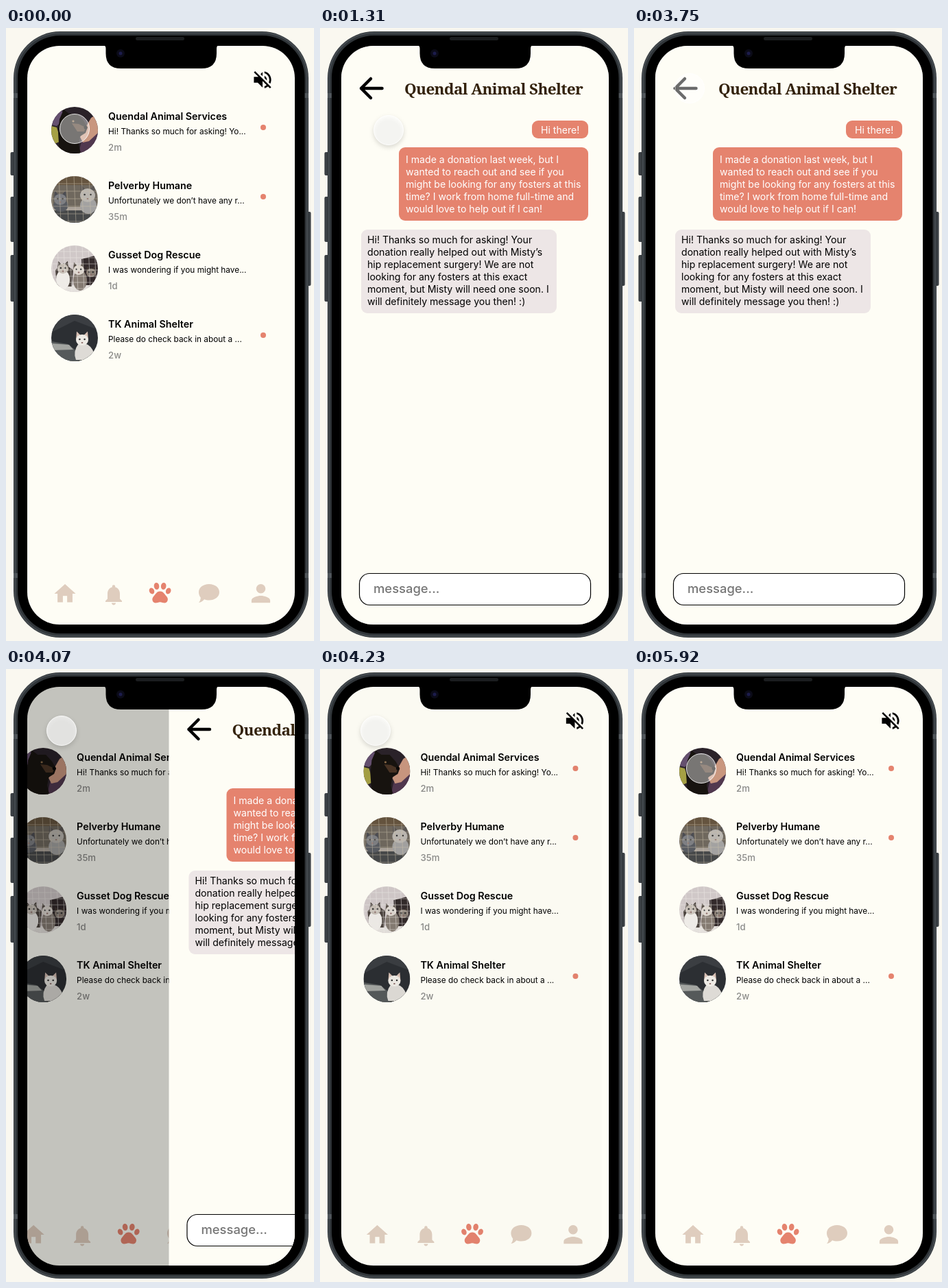
Write an HTML page that moves like this. It is 449 by 894 pixels and loops after 6080 ms.

```html
<!DOCTYPE html>
<html lang="en">
<head>
<meta charset="utf-8">
<title>Messages prototype</title>
<style>
  html, body { margin: 0; width: 100%; height: 100%; overflow: hidden; background: #faf8f0; }
  svg { display: block; }
  text { font-family: Inter, "Open Sans", sans-serif; }
  .name { font-size: 14.3px; font-weight: 600; }
  .preview { font-size: 11.85px; }
  .age { font-size: 13.2px; font-weight: 500; fill: #8b8b89; }
  .msg { font-size: 14.1px; }
  .hint { font-size: 18.4px; font-weight: 500; fill: #757575; }
  .head { font: bold 22.5px "Noto Serif", serif; letter-spacing: -.65px; fill: #33220c; }
  #cursor { fill: #fff; fill-opacity: .42; stroke: #fff; stroke-opacity: .85; }
  #cursor.released { fill-opacity: .66; filter: drop-shadow(0 3px 3px rgba(0, 0, 0, .2)); }
</style>
</head>
<body>
<svg width="449" height="894" viewBox="0 0 449 894">
  <defs>
    <clipPath id="screen"><rect x="31" y="26" width="390" height="844" rx="47"/></clipPath>
    <clipPath id="round"><circle r="34"/></clipPath>
  </defs>

  <!-- Phone body -->
  <g fill="#3a3f44">
    <rect x="6.500" y="181" width="7" height="34" rx="2"/>
    <rect x="6.500" y="246" width="7" height="66" rx="2"/>
    <rect x="6.500" y="331" width="7" height="68" rx="2"/>
    <rect x="438" y="268" width="6.500" height="108" rx="2"/>
  </g>
  <rect x="11" y="5" width="430" height="884" rx="68" fill="#303539"/>
  <rect x="13" y="7" width="426" height="880" rx="66" fill="none" stroke="#454b50" stroke-width="2"/>
  <path d="M11 95h6v7h-6zM435 95h6v7h-6zM11 795h6v7h-6zM435 795h6v7h-6z" fill="#50565b"/>
  <rect x="17" y="11" width="418.500" height="872" rx="62"/>

  <g clip-path="url(#screen)">
    <g id="list">
      <rect x="31" y="26" width="500" height="844" fill="#fefdf5"/>
      <g id="rows"></g>
      <path transform="translate(357.2 58.7) scale(1.4)" d="M16.5 12c0-1.77-1.02-3.29-2.5-4.03v2.21l2.45 2.45c.03-.2.05-.41.05-.63zm2.5 0c0 .94-.2 1.82-.54 2.64l1.51 1.51C20.63 14.91 21 13.5 21 12c0-4.28-2.99-7.86-7-8.77v2.06c2.89.86 5 3.54 5 6.71zM4.27 3L3 4.27 7.73 9H3v6h4l5 5v-6.73l4.25 4.25c-.67.52-1.42.93-2.25 1.18v2.06c1.38-.31 2.63-.95 3.69-1.81L19.73 21 21 19.73l-9-9L4.27 3zM12 4L9.91 6.09 12 8.18V4z"/>
      <g fill="#dfcdbe">
        <path transform="translate(67.3 806.3) scale(1.56)" d="M10 20v-6h4v6h5v-8h3L12 3 2 12h3v8z"/>
        <path transform="translate(139 808.5) scale(1.5)" d="M12 22c1.1 0 2-.9 2-2h-4c0 1.1.9 2 2 2zm6-6v-5c0-3.07-1.64-5.64-4.5-6.32V4a1.5 1.5 0 0 0-3 0v.68C7.63 5.36 6 7.92 6 11v5l-2 2v1h16v-1z"/>
        <path d="M296 811c8.500 0 15 5 15 11.800s-6.500 11.800-15 11.800c-2.500 0-5-.4-7-1.300-2 2.400-5 4.400-8 4.700 1.800-2 2.700-4.500 2.800-7.300-1.800-2.200-2.800-5-2.800-7.900 0-6.800 6.500-11.800 15-11.800z"/>
        <path transform="translate(351.1 804.2) scale(1.7)" d="M12 12a4 4 0 1 0 0-8 4 4 0 0 0 0 8zm0 2c-2.670 0-8 1.340-8 4v2h16v-2c0-2.660-5.330-4-8-4z"/>
      </g>
      <g fill="#e5836e">
        <ellipse cx="212.500" cy="821" rx="3.600" ry="4.700" transform="rotate(-24 212.5 821)"/>
        <ellipse cx="219.500" cy="814" rx="3.800" ry="5" transform="rotate(-8 219.5 814)"/>
        <ellipse cx="229.700" cy="814" rx="3.800" ry="5" transform="rotate(8 229.7 814)"/>
        <ellipse cx="236.700" cy="821" rx="3.600" ry="4.700" transform="rotate(24 236.7 821)"/>
        <path d="M224.600 821.500c5 0 6.500 4.500 9.500 7.500 3.500 3.500 1.500 9.500-3 9.500-2.500 0-4-1.300-6.500-1.300s-4 1.300-6.500 1.300c-4.500 0-6.500-6-3-9.500 3-3 4.500-7.500 9.500-7.500z"/>
      </g>
    </g>
    <rect id="dim" x="31" y="26" width="390" height="844"/>

    <g id="chat">
      <rect x="31" y="26" width="390" height="844" fill="#fefdf5"/>
      <path d="M90.500 88H60M74 74L60 88l14 14" fill="none" stroke="#000" stroke-width="4.500" stroke-linecap="round" stroke-linejoin="round"/>
      <text class="head" x="123" y="97">Quendal Animal Shelter</text>
      <g id="bubbles"></g>
      <rect x="57.500" y="795.500" width="337" height="46" rx="15" fill="#fff" stroke="#000" stroke-width="1.200"/>
      <text class="hint" x="78" y="824">message...</text>
    </g>
  </g>

  <!-- Notch, speaker and camera -->
  <path d="M141 25q4.500 0 4.500 5v7q0 22 22 22h117.500q22 0 22-22v-7q0-5 4.500-5z"/>
  <rect x="189" y="13" width="71" height="5" rx="2.500" fill="#1b1d1f"/>
  <circle cx="167" cy="37" r="6" fill="#0b0b18"/>
  <circle cx="167" cy="37" r="2.500" fill="#1c1c4c"/>

  <circle id="cursor" r="21.500"/>
</svg>

<script>
const LOOP = 6080, WIDTH = 390;
const $ = id => document.getElementById(id);
const text = (cls, x, y, str, fill = '#000') =>
  `<text class="${cls}" x="${x}" y="${y}" fill="${fill}">${str}</text>`;
const shape = (d, fill) => `<path d="${d}" fill="${fill}"/>`;
const oval = (x, y, rx, ry, fill) =>
  `<ellipse cx="${x}" cy="${y}" rx="${rx}" ry="${ry}" fill="${fill}"/>`;
const base = fill => shape('M-34-34h68v68h-68z', fill);

function cage(gap, color) {
  let d = '';
  for (let p = -34; p < 34; p += gap) d += `M${p}-34l3 68M-34 ${p}h68`;
  return `<path d="${d}" stroke="${color}" stroke-width=".8" opacity=".6"/>`;
}

// A small animal face with ears and eyes
const face = (x, y, r, fur, ear) =>
  shape(`M${x - r} ${y}l1-${r * 1.4} ${r * .7} ${r * .7}zM${x + r} ${y}l-1-${r * 1.4}-${r * .7} ${r * .7}z`, ear) +
  oval(x, y, r, r * .9, fur) +
  oval(x - r * .4, y - 1, 1.3, 1.2, '#333') + oval(x + r * .4, y - 1, 1.3, 1.2, '#333') +
  oval(x, y + r * .45, 1.4, 1, '#8a6a66');

const photos = [
  base('#2a2229') +
    shape('M-34-24l14-8 6 14-12 12-8-2z', '#65506f') +
    shape('M-34-6l8 2 6 20-14 6z', '#a5a044') +
    shape('M6 34l4-18 24-12v30z', '#51384f') +
    shape('M34-24l-10 6-8 14-8 14 4 8 9-2 13-12z', '#c9977f') +
    shape('M-22 34l-2-30 2-20 6-14 8 6 12 0 9 10 6 10-3 8-8 5-2 12 3 13z', '#17130f') +
    shape('M-4-10l10 1 10 5-2 6-10 0z', '#4a3424') +
    oval(-2, -13, 1.6, 1.4, '#8a6a48') + oval(16, -4, 2.5, 2.5, '#080706'),
  base('#6f685e') +
    shape('M-34-34h68v13h-68z', '#65543f') +
    shape('M-34 11h68v5h-68z', '#aaa299') + shape('M-34 16h68v18h-68z', '#47494a') +
    oval(-20, 9, 11, 9, '#585b61') + face(-21, 0, 9, '#7e7f83', '#4b4c52') +
    oval(20, 9, 12, 12, '#a3a2a1') + face(19, -6, 11, '#bab6b0', '#5b5755') +
    cage(11, '#d0c4ae'),
  base('#d0c8c8') +
    shape('M10-14l24-6v46l-22 2z', '#332a2b') +
    shape('M-34 24h68v10h-68z', '#e4e0dc') +
    shape('M-28 2l12-10 14 10-2 24h-22z', '#4c443f') +
    oval(-17, 16, 10, 14, '#eeebe7') + face(-17, 0, 8, '#c4bcb3', '#4c443f') +
    oval(8, 17, 10, 15, '#857b72') + face(6, 2, 8, '#ddd6ce', '#5a514a') +
    face(24, 6, 7, '#8a7f75', '#433933') + cage(9, '#f2eeea'),
  base('#2c2f33') +
    shape('M-34-34h68v22L0-25-34-8z', '#3b3e42') +
    shape('M-34 5l24 4 17 13v12h-41z', '#55595a') +
    shape('M-34 8l26 2 6 7-32 1z', '#a3a5a1') +
    shape('M7 30l27-10v14H4z', '#4d504d') +
    shape('M6 8q14-2 20 9 5 8 0 15H2q-5-12 4-24z', '#dedbd6') +
    face(11, 3, 9, '#eeebe5', '#d8c0b4')
];

const rows = [
  ['Quendal Animal Services', 'Hi! Thanks so much for asking! Yo...', '2m', 1],
  ['Pelverby Humane', 'Unfortunately we don’t have any r...', '35m', 1],
  ['Gusset Dog Rescue', 'I was wondering if you might have...', '1d', 0],
  ['TK Animal Shelter', 'Please do check back in about a ...', '2w', 1]
];
$('rows').innerHTML = rows.map(([name, preview, age, unread], i) =>
  `<g transform="translate(0 ${101 * i})">
    <g transform="translate(100 149)" clip-path="url(#round)">${photos[i]}</g>` +
    text('name', 149, 134, name) + text('preview', 149, 155, preview) + text('age', 149, 179, age) +
    (unread ? oval(375, 145, 4, 4, '#e5836e') : '') + '</g>').join('');

const bubble = (x, y, w, h, fill, color, tx, ty, lines) =>
  `<rect x="${x}" y="${y}" width="${w}" height="${h}" rx="9" fill="${fill}"/>` +
  lines.map((line, i) => text('msg', tx, ty + 18 * i, line, color)).join('');
$('bubbles').innerHTML =
  bubble(309, 135, 82, 26, '#e5836e', '#fff', 322, 154, ['Hi there!']) +
  bubble(115, 174, 276, 107, '#e5836e', '#fff', 125, 197, [
    'I made a donation last week, but I',
    'wanted to reach out and see if you',
    'might be looking for any fosters at this',
    'time? I work from home full-time and',
    'would love to help out if I can!']) +
  bubble(60, 294, 285, 122, '#ede6e6', '#000', 69, 314, [
    'Hi! Thanks so much for asking! Your',
    'donation really helped out with Misty’s',
    'hip replacement surgery! We are not',
    'looking for any fosters at this exact',
    'moment, but Misty will need one soon. I',
    'will definitely message you then! :)']);

// Progress from 0 to 1 in n held steps, the first at time a, the last at b
const steps = (t, a, b, n) =>
  t < a ? 0 : Math.min(n, 1 + Math.floor((t - a) / (b - a) * (n - 1) + 1e-6)) / n;
const smooth = k => k * k * (3 - 2 * k);
const mix = (a, b, k) => a + (b - a) * k;
const move = (el, x, y) => el.setAttribute('transform', `translate(${x} ${y})`);

function draw(t) {
  const open = t < 4070
    ? 1 - (1 - steps(t, 1230, 1310, 2)) ** 4.4
    : (1 - steps(t, 4070, 4310, 4)) ** 2.62;
  move($('list'), -WIDTH / 4 * open, 0);
  move($('chat'), WIDTH * (1 - open), 0);
  $('dim').setAttribute('opacity', .49 * open);

  const pressed = t < 820 || (t >= 3750 && t < 4070) || t >= 5920;
  const up = smooth(steps(t, 2630, 3590, 13) ** .85);
  const down = smooth(steps(t, 4890, 5760, 12));
  const x = mix(mix(100, 81, up), 98, down);
  const y = mix(mix(149, 90, up), 147, down);
  move($('cursor'), x, pressed ? y - 2 : y);
  $('cursor').setAttribute('class', pressed ? '' : 'released');
}

function tick() {
  draw(performance.now() % LOOP);
  requestAnimationFrame(tick);
}
tick();
</script>
</body>
</html>
```
